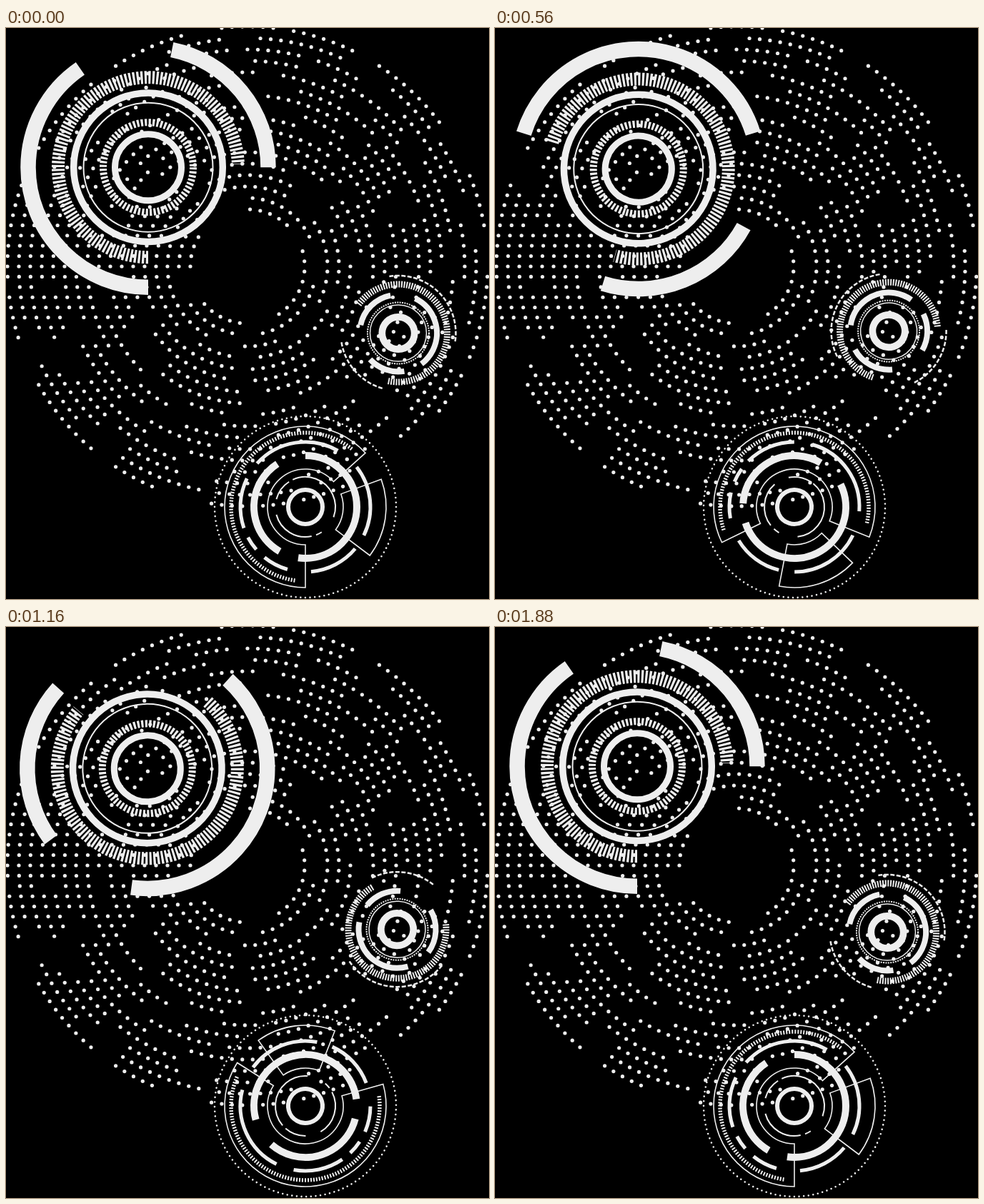
An HTML page with a canvas that plays this animation: 676x800 px, repeating every 1920 ms.

```html
<!DOCTYPE html>
<html lang="en">
<head>
<meta charset="utf-8">
<title>Rotating dials</title>
<style>
html, body { margin: 0; width: 100%; height: 100%; overflow: hidden; background: #000; }
canvas { display: block; }
</style>
</head>
<body>
<canvas id="stage" width="676" height="800"></canvas>
<script>
const ctx = document.getElementById('stage').getContext('2d');
const TAU = Math.PI * 2, STEP = 40, STEPS = 48;
const INK = '#eee';
const rad = deg => deg * Math.PI / 180;

let seed = 7;
function random(min, max) {
  seed = (seed * 16807) % 2147483647;
  return min + Math.floor(seed / 2147483647 * (max - min + 1));
}

// Concentric rings of evenly spaced dots, broken into random runs and gaps
function makeDots() {
  const dots = [];
  for (let r = 80; r <= 336; r += 16) {
    const count = Math.round(TAU * r / 14.5);
    let i = 0;
    while (i < count) {
      const end = Math.min(count, i + random(4, 9));
      for (; i < end; i++) {
        const a = Math.PI + TAU * i / count;
        const x = 338 + r * Math.cos(a), y = 334 + r * Math.sin(a);
        const bare = Math.hypot(x - 550, y - 650) < 75;
        if (!bare) dots.push([x, y]);
      }
      i += random(1, 5);
    }
  }
  return dots;
}
const dots = makeDots();

function drawDots() {
  for (const [x, y] of dots) {
    ctx.beginPath();
    ctx.arc(x, y, 2.6, 0, TAU);
    ctx.fill();
  }
}

function arc(r, w, from = 0, to = 360, dash = [], cap = 'butt') {
  ctx.lineWidth = w;
  ctx.lineCap = cap;
  ctx.setLineDash(dash);
  ctx.beginPath();
  ctx.arc(0, 0, r, rad(from), rad(to));
  ctx.stroke();
}

function arcs(r, w, spans, dash) {
  for (const [from, to] of spans) arc(r, w, from, to, dash);
}

function sector(inner, outer, from, to) {
  ctx.lineWidth = 1.6;
  ctx.setLineDash([]);
  ctx.beginPath();
  ctx.arc(0, 0, outer, rad(from), rad(to));
  ctx.arc(0, 0, inner, rad(to), rad(from), true);
  ctx.closePath();
  ctx.stroke();
}

// Turns about a pivot; the dial sits slightly off it and so wobbles
function dial(x, y, offset, turn, draw) {
  ctx.save();
  ctx.translate(x, y);
  ctx.rotate(turn * TAU);
  ctx.translate(0, offset);
  draw();
  ctx.restore();
}

function largeDial() {
  arcs(168, 21.5, [[90, 235.5], [-78.6, 0]]);
  arc(126, 18, 90, 358, [3.2, 2.3]);
  arc(104.3, 9.5);
  arc(90.5, 2);
  arc(63, 10, 0, 360, [3.2, 2.3]);
  arc(46.5, 9);
}

function smallDial() {
  arcs(80.5, 2.5, [[261, 370], [106, 172]], [6, 2.5]);
  arc(68.5, 9, 216, 462, [2, 1.6]);
  arcs(54, 8, [[192, 258.5], [-64, 53], [81, 137]]);
  arc(43, 2, 0, 360, [2, 1.4]);
  arc(39.5, 1.5);
  arc(22.7, 9.7);
}

function mediumDial() {
  arc(127, 2.6, 0, 360, [0, TAU * 127 / 120], 'round');
  sector(53, 113, 90, 318);
  sector(53, 113, -20, 37);
  arc(104, 5.5, 98, 309, [2, 2]);
  arcs(91, 5, [[222, 300], [161, 206], [139, 152], [106, 129], [40, 85], [-38, 26]]);
  arcs(72, 10, [[-90, 98], [120, 237]]);
  arcs(42, 2, [[-115, 20], [57, 69], [78, 165], [195, 237]]);
  arc(24, 6);
}

const easeInOut = p => p < 0.5 ? 2 * p * p : 1 - 2 * (1 - p) ** 2;

function frame(now) {
  const p = Math.floor(now / STEP) % STEPS / (STEPS - 1);
  ctx.fillStyle = '#000';
  ctx.fillRect(0, 0, 676, 800);
  ctx.fillStyle = ctx.strokeStyle = INK;
  drawDots();
  dial(199, 197, -1.8, p, largeDial);
  dial(549, 425.3, 2.2, -p, smallDial);
  dial(419, 671, 0, easeInOut(p), mediumDial);
}

const start = performance.now();
function loop() {
  frame(performance.now() - start);
  requestAnimationFrame(loop);
}
loop();
</script>
</body>
</html>
```
